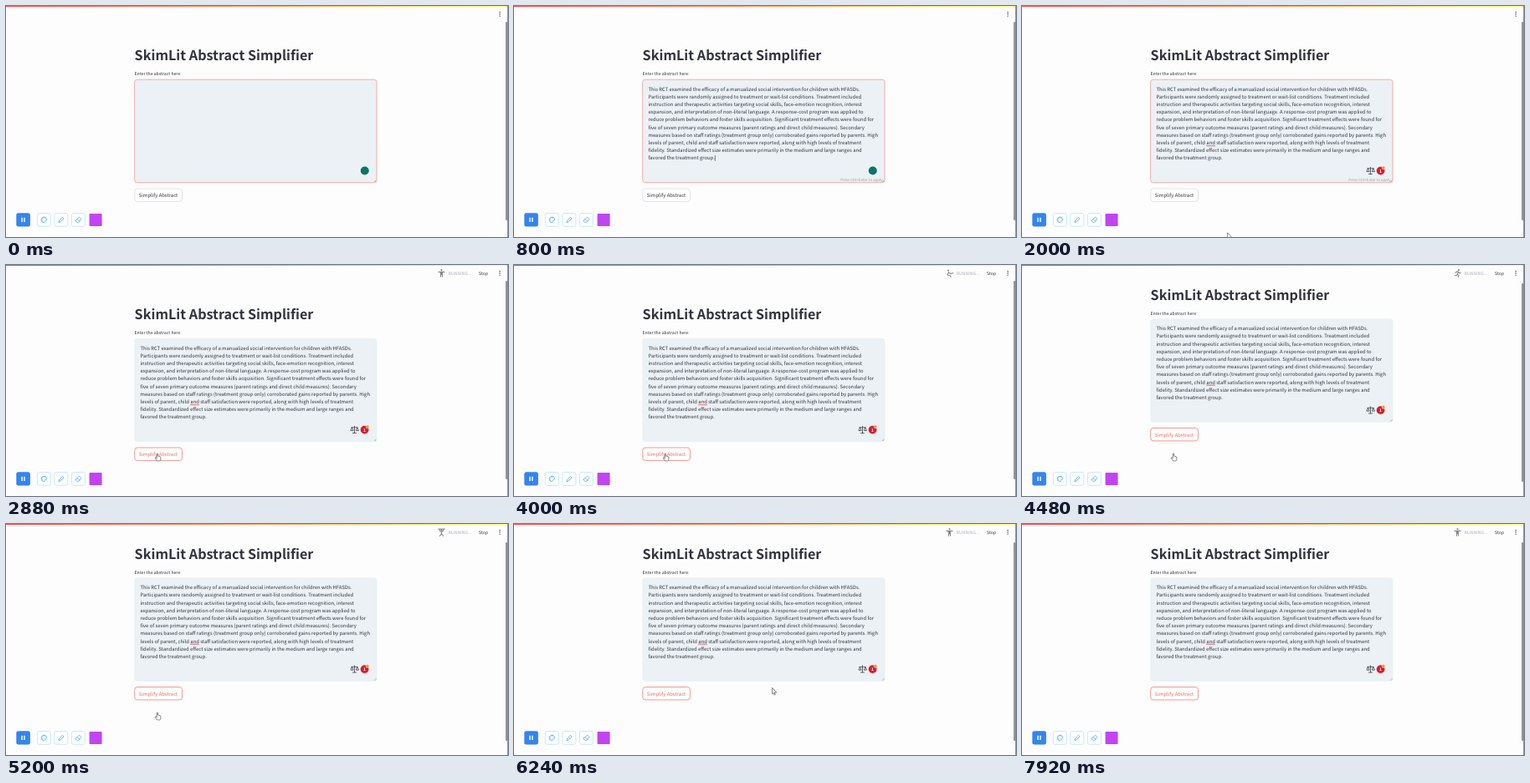
Recreate the animation shown at these times as an HTML page. Size 600 by 277 pixels, loop 8000 ms.

```html
<!DOCTYPE html>
<html lang="en">
<head>
<meta charset="utf-8">
<title>Abstract Simplifier</title>
<style>
  html, body { margin: 0; width: 100%; height: 100%; overflow: hidden; background: #fdfdfd; }
  svg { display: block; width: 600px; height: 277px; }
  text {
    font-family: "Noto Sans CJK JP", "Noto Sans CJK SC", "Noto Sans CJK", "Open Sans", sans-serif;
    font-size: 5.15px; fill: #31333f; text-rendering: geometricPrecision; white-space: pre;
  }
  .title { font-size: 16.2px; font-weight: 700; }
  .body { font-size: 5.9px; }
  .hint { font-size: 4.4px; fill: #9a9ca4; text-anchor: end; }
  .line { fill: none; stroke-linecap: round; stroke-linejoin: round; }
  .tool { fill: #fff; stroke: #bfe2f8; stroke-width: .8; }
  .blue { stroke: #55b4ee; stroke-width: .9; }
</style>
</head>
<body>
<svg viewBox="0 0 600 277">
  <defs>
    <linearGradient id="bar">
      <stop offset="0" stop-color="#ff4b4b"/><stop offset="1" stop-color="#fffd80"/>
    </linearGradient>
  </defs>
  <rect width="600" height="277" fill="#fdfdfd"/>

  <g id="page">
    <text class="title" x="153.6" y="65.4">SkimLit Abstract Simplifier</text>
    <text x="153.6" y="83">Enter the abstract here:</text>
    <rect id="box" x="153.7" y="88.2" width="289.4" height="123.6" rx="3.2" fill="#ebf1f4" stroke-width=".8"/>
    <path class="line" d="M440.2 210.8l2-2M441.5 210.9l.8-.8" stroke="#777" stroke-width=".4"/>
    <g id="abstract"></g>
    <path id="caret" d="M240.3 179v6.8" stroke="#222" stroke-width=".6"/>
    <text id="hint" class="hint" x="440.5" y="210.4">Press Ctrl+Enter to apply</text>
    <circle id="ready" cx="428.8" cy="197.5" r="5" fill="#0b7467"/>
    <g id="alerts">
      <path class="line" d="M220.6 167.7h10" stroke="#e5484d" stroke-width=".8"/>
      <path class="line" d="M416.5 193.3v8M414.5 201.5h4M413 194.8h7M413.3 195l-1.3 3.6h2.8zM419.7 195l-1.4 3.6h2.8z" stroke="#3c4148" stroke-width=".8"/>
      <circle cx="428.6" cy="197.6" r="4.9" fill="#dc1a2c"/>
      <text x="428.4" y="199.7" text-anchor="middle" style="fill:#fff;font-weight:700">1</text>
      <circle cx="432" cy="194" r="1.9" fill="#f0922b" stroke="#fdf3ee" stroke-width=".4"/>
    </g>
    <rect id="button" x="153.8" y="219" width="56.7" height="15.4" rx="3.2" fill="#fefefe" stroke-width=".8"/>
    <text id="caption" class="body" x="158.8" y="229.1">Simplify Abstract</text>
  </g>

  <rect width="600" height="1" fill="url(#bar)"/>
  <g id="status">
    <path id="athlete" class="line" stroke="#85878f" stroke-width="1.1"/>
    <text x="528.8" y="12" style="fill:#adb0bb">RUNNING...</text>
    <text x="565" y="12.1">Stop</text>
  </g>
  <path class="line" d="M590.2 7.5h0M590.2 9.8h0M590.2 12.1h0" stroke="#31333f" stroke-width="1.4"/>
  <rect id="thumb" x="597.2" y="19" width="2" height="238" rx="1" fill="#8d8d8d"/>
  <path d="M599.7 0v277" stroke="#333" stroke-width=".6"/>

  <rect x="12.3" y="248.2" width="16.6" height="16.4" rx="2.4" fill="#3584ee"/>
  <path d="M19 253.7v5.4M22 253.7v5.4" stroke="#fff" stroke-width="1.4"/>
  <rect class="tool" x="37.4" y="248.5" width="16" height="15.8" rx="2.4"/>
  <rect class="tool" x="57.9" y="248.5" width="16" height="15.8" rx="2.4"/>
  <rect class="tool" x="78.5" y="248.5" width="16" height="15.8" rx="2.4"/>
  <g class="line blue">
    <path d="M45.4 253.2a3.2 3.2 0 1 0 0 6.4c1.5 0 .2-1.7 1.4-2.2 1-.3 1.9.1 1.9-1.2a3.2 3.2 0 0 0-3.3-3zM44 255.5h0M46 254.9h0M43.8 257.4h0"/>
    <path d="M63.1 259.4l.6-2.3 3.8-3.8 1.6 1.6-3.8 3.8z"/>
    <path d="M83.3 257.2l3.5-3.5q.8-.7 1.6 0l1.1 1.1q.7.8 0 1.6l-2.8 2.8q-.9.8-1.8 0l-1.6-1.2q-.6-.4 0-.8zM85.1 255.5l2.7 2.7"/>
  </g>
  <rect x="99.6" y="248.9" width="15" height="15" rx="1" fill="#c144f0"/>

  <g id="cursor" class="line" stroke="#444" stroke-width=".65">
    <path id="hand" fill="#fff" d="M-.8 4.6V.6q.7-1 1.4 0v2.8q1.1-.5 1.3.4 1-.4 1.1.5.9-.1.9.8v1.8q-.2 2.1-1.2 2.2H.1q-.7 0-1.4-1.3l-1.6-2.3q.5-1.4 2.1.2z"/>
    <path id="arrow" fill="#fff" d="M0 0v7l1.6-1.4 1.1 2.6 1.1-.5-1.1-2.5h2.2z"/>
  </g>
</svg>
<script>
const LOOP = 8000;
const PASTE = 400, REVIEW = 1600, HOVER = 2400, CLICK = 2640;
const $ = id => document.getElementById(id);
const show = (id, on) => $(id).setAttribute("visibility", on ? "visible" : "hidden");

const lines = [
  "This RCT examined the efficacy of a manualized social intervention for children with HFASDs.",
  "Participants were randomly assigned to treatment or wait-list conditions. Treatment included",
  "instruction and therapeutic activities targeting social skills, face-emotion recognition, interest",
  "expansion, and interpretation of non-literal language. A response-cost program was applied to",
  "reduce problem behaviors and foster skills acquisition. Significant treatment effects were found for",
  "five of seven primary outcome measures (parent ratings and direct child measures). Secondary",
  "measures based on staff ratings (treatment group only) corroborated gains reported by parents. High",
  "levels of parent, child and staff satisfaction were reported, along with high levels of treatment",
  "fidelity. Standardized effect size estimates were primarily in the medium and large ranges and",
  "favored the treatment group."
];
$("abstract").innerHTML = lines.map((line, i) =>
  `<text class="body" x="160.5" y="${101.6 + i * 9.21}">${line}</text>`).join("");

// Each pose: [start within the cycle, path of a small athlete]
const CYCLE = 1680;
const HEAD = "a.5.5 0 1 1 .1 0";
const poses = [
  [0, `M520.5 6.6${HEAD}M517 8.4h7M520.5 8.4v3M519.5 8.6v5.5M521.5 8.6v5.5`],
  [160, `M520.5 6.8${HEAD}M517.5 6l3 2.8 3-2.8M520.5 8.8v2.4l-2 3M520.5 11.2l2 3`],
  [320, `M519.5 6.8${HEAD}M517 9.8l2.5-1.2 3 1M519.5 8.8l.5 2.5 4-1M520 11.3l-1 3`],
  [480, `M522.5 8.8${HEAD}M517 11.2l3-2 2.5 2M516.5 13.3q1.5-1 3 0t3 0 3 0`],
  [640, `M520.5 7.8${HEAD}M516.5 6h8M518 6l1 3h3l1-3M520.5 9v2.5l-2 2.8M520.5 11.5l2 2.8`],
  [880, `M521.5 6.6${HEAD}M518 10l3-1.6 2.5 2M521 8.4l-1.5 3 2 1-1 1.6M516.5 14.2l8-.3`],
  [1040, `M519 7${HEAD}M519.3 8.8l-1.2 3.2 3 .5 1 1.8M519.3 8.8l3 1.6 2.5-1`],
  [1200, `M521 6.8${HEAD}M517.8 8l3 .8 3.2-1.5M520.8 8.8l-.8 2.6-3 .8M520 11.4l2.8 1 .2 2`],
  [1360, `M521.5 6.4${HEAD}M522.8 9.2l-1.6-1.4-2.3 2 2 1.3v2M518 10.3a1.8 1.8 0 1 1-.1 0M523.7 10.3a1.8 1.8 0 1 1-.1 0`],
  [1600, `M521.8 6.6${HEAD}M518 9.2l2-1.4 1.6.4 1 1.6 1.6-.4M521.4 8.4l-1.2 2.8 1.8 1.2-.5 2M520.2 11.2l-1 1.5h-2`]
];

const scrollTrack = [[4240, 0], [4320, -4.7], [4400, -16], [4480, -23.5]];
const pathX = [[1900, 262], [2400, 181], [5900, 181], [6000, 308.6], [6880, 308.6], [7120, 400]];
const pathY = [[1900, 284], [2400, 225.8], [5900, 225.8], [6000, 196.8], [6880, 196.8], [7120, -12]];

function valueAt(track, t) {
  const next = track.findIndex(([time]) => time > t);
  if (next < 0) return track[track.length - 1][1];
  if (next === 0) return track[0][1];
  const [t0, a] = track[next - 1], [t1, b] = track[next];
  return a + (b - a) * (t - t0) / (t1 - t0);
}

function render(t) {
  const scroll = valueAt(scrollTrack, t);
  const focused = t < CLICK, hot = t >= HOVER;

  $("page").setAttribute("transform", `translate(0 ${scroll})`);
  $("thumb").setAttribute("y", 19 - scroll * .13);

  show("abstract", t >= PASTE);
  show("caret", focused && t >= PASTE && (t - PASTE) % 1060 < 530);
  show("hint", focused && t >= PASTE);
  show("ready", t < REVIEW);
  show("alerts", t >= REVIEW);
  $("box").setAttribute("stroke", focused ? "#f99a98" : "#ebf1f4");
  $("button").setAttribute("stroke", hot ? "#f08078" : "#dcdde0");
  $("caption").style.fill = hot ? "#ee6a60" : "#31333f";

  show("status", !focused);
  const phase = (t - 2880 + 2 * CYCLE) % CYCLE;
  $("athlete").setAttribute("d", poses.filter(([start]) => start <= phase).pop()[1]);

  const onHand = t >= HOVER && t < 5920;
  show("hand", onHand);
  show("arrow", !onHand);
  $("cursor").setAttribute("transform", `translate(${valueAt(pathX, t)} ${valueAt(pathY, t)})`);
}

const begin = performance.now();
(function tick() {
  render((performance.now() - begin) % LOOP);
  requestAnimationFrame(tick);
})();
</script>
</body>
</html>
```
